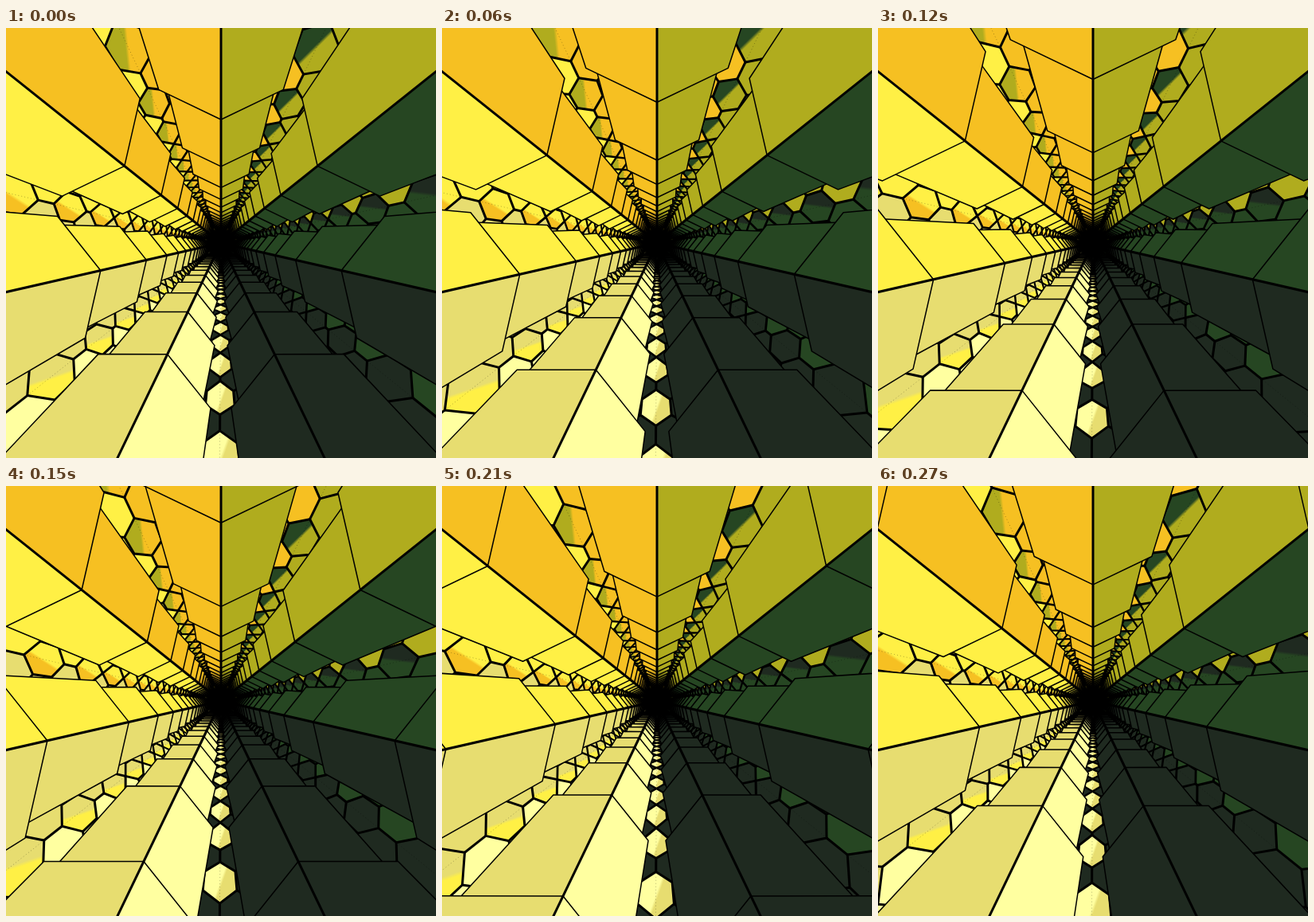
Animation of 540 by 540 pixels, one loop 0.3 s. Source, as an HTML page with a canvas:

```html
<!DOCTYPE html>
<html>
<head>
<meta charset="utf-8">
<style>
html, body { margin: 0; height: 100%; overflow: hidden; background: #000; }
canvas { display: block; width: 540px; height: 540px; }
</style>
</head>
<body>
<canvas id="stage" width="540" height="540"></canvas>
<script>
const ctx = document.getElementById('stage').getContext('2d');
const LOOP = 300, STEP = 30;
const HALF = Math.PI / 7;              // half a sector
const WALL_PERIOD = 0.00396;           // depth is measured as 1 / screen radius
const HEX_PERIOD = 0.00141;
const HEX_SHIFT = 0.006, HEX_WIDTH = 0.09;

const orange = '#f6c022', olive = '#b0ac1e', green = '#264622', dark = '#1f2a20';
const light = '#ffffa0', khaki = '#e7dd70', yellow = '#fff045';

// Sectors clockwise from the upper right. ccw/cw: wall colours on each side,
// left/right: outer cells, base/blend: the middle column of hexagons.
const sector = (own, prev, next) =>
  ({ ccw: own, cw: own, left: prev, right: own, base: own, blend: next });
const sectors = [
  sector(olive, orange, green),
  sector(green, olive, dark),
  sector(dark, green, dark),
  { ccw: dark, cw: light, left: dark, right: dark, base: light, blend: khaki },
  sector(khaki, light, yellow),
  sector(yellow, khaki, orange),
  sector(orange, yellow, olive)
];

function trace(points, close) {
  ctx.beginPath();
  points.forEach(([x, y]) => ctx.lineTo(x, y));
  if (close) ctx.closePath();
}

function fill(points, color) {
  ctx.fillStyle = color;
  trace(points, true);
  ctx.fill();
}

function stroke(points, width, close) {
  ctx.lineWidth = width;
  ctx.strokeStyle = '#000';
  trace(points, close);
  ctx.stroke();
}

const clamp = (x, low, high) => Math.min(high, Math.max(low, x));
const hexPoint = (depth, side) => [1 / depth, (side * HEX_WIDTH + HEX_SHIFT) / depth];

// Half the length of the edge joining two hexagons; it closes up with distance.
const halfEdge = depth => 0.0002 * clamp((1 / depth - 160) / 28, 0, 1);

function drawHexagons(s, phase) {
  const far = 800;
  const seam = [far, far * HEX_SHIFT];
  fill([[0, 0], seam, [far, -far * 0.4]], s.left);
  fill([[0, 0], seam, [far, far * 0.4]], s.right);

  for (let i = 30; i >= -2; i--) {
    const front = 0.00444 + (i - phase) * HEX_PERIOD;
    const back = front + HEX_PERIOD;
    const p = (part, side) => hexPoint(front + part * HEX_PERIOD, side);
    const near = hexPoint(front + halfEdge(front), 0);
    const top = hexPoint(back - halfEdge(back), 0);
    const hex = [near, p(1 / 3, 1), p(2 / 3, 1), top, p(2 / 3, -1), p(1 / 3, -1)];
    const [cx, cy] = p(1 / 2, 0);
    const d = cx * HEX_WIDTH;
    const shade = ctx.createLinearGradient(
      cx - d * 0.34, cy + d * 0.94, cx + d * 0.34, cy - d * 0.94);
    shade.addColorStop(0.52, s.base);
    shade.addColorStop(0.6, s.blend);
    fill(hex, shade);

    ctx.setLineDash([1, 3]);
    ctx.globalAlpha = 0.35;
    stroke([near, top], 0.8);
    ctx.setLineDash([]);
    ctx.globalAlpha = 1;

    const width = Math.min(3, 1.3 + cx * 0.01);
    stroke(hex, width, true);
    stroke([top, hexPoint(back + halfEdge(back), 0)], width);
    for (const side of [-1, 1]) {
      stroke([p(5 / 6, side * 2), p(2 / 3, side)], width);
      stroke([p(1 / 6, side * 2), p(1 / 3, side)], width);
    }
  }
}

function drawWall(side, color, phase) {
  const node = z => [Math.cos(HALF) / z, side * Math.sin(HALF) / z];
  const corner = (z, k) => [(1.339 - 0.07 * k) / z, side * (0.084 + 0.0565 * k) / z];
  for (let n = 24; n >= 0; n--) {
    const back = 0.00645 + (n - phase) * WALL_PERIOD;
    const front = Math.max(back - WALL_PERIOD, 0.0012);
    const edge = corner(front, (back - front) / WALL_PERIOD);
    fill([node(back), corner(back, 0), edge, node(front)], color);
    stroke([node(back), corner(back, 0), edge], 1.5);
  }
}

function draw(phase) {
  ctx.setTransform(1, 0, 0, 1, 0, 0);
  ctx.fillStyle = '#000';
  ctx.fillRect(0, 0, 540, 540);
  ctx.lineJoin = 'round';

  sectors.forEach((s, i) => {
    ctx.setTransform(1, 0, 0, 1, 270, 270);
    ctx.rotate(-Math.PI / 2 + HALF * (2 * i + 1));
    drawHexagons(s, phase);
    drawWall(-1, s.ccw, phase);
    drawWall(1, s.cw, phase);
  });

  ctx.setTransform(1, 0, 0, 1, 270, 270);
  ctx.rotate(-Math.PI / 2);
  for (let i = 0; i < 7; i++) {
    stroke([[0, 0], [400, 0]], 3);
    ctx.rotate(2 * HALF);
  }

  const fog = ctx.createRadialGradient(0, 0, 17, 0, 0, 42);
  fog.addColorStop(0, 'rgba(0,0,0,1)');
  fog.addColorStop(0.3, 'rgba(0,0,0,0.5)');
  fog.addColorStop(1, 'rgba(0,0,0,0)');
  ctx.fillStyle = fog;
  ctx.fillRect(-50, -50, 100, 100);
}

const start = performance.now();
function tick() {
  const t = (performance.now() - start) % LOOP;
  draw(Math.floor(t / STEP) * STEP / LOOP);
  requestAnimationFrame(tick);
}
tick();
</script>
</body>
</html>
```
